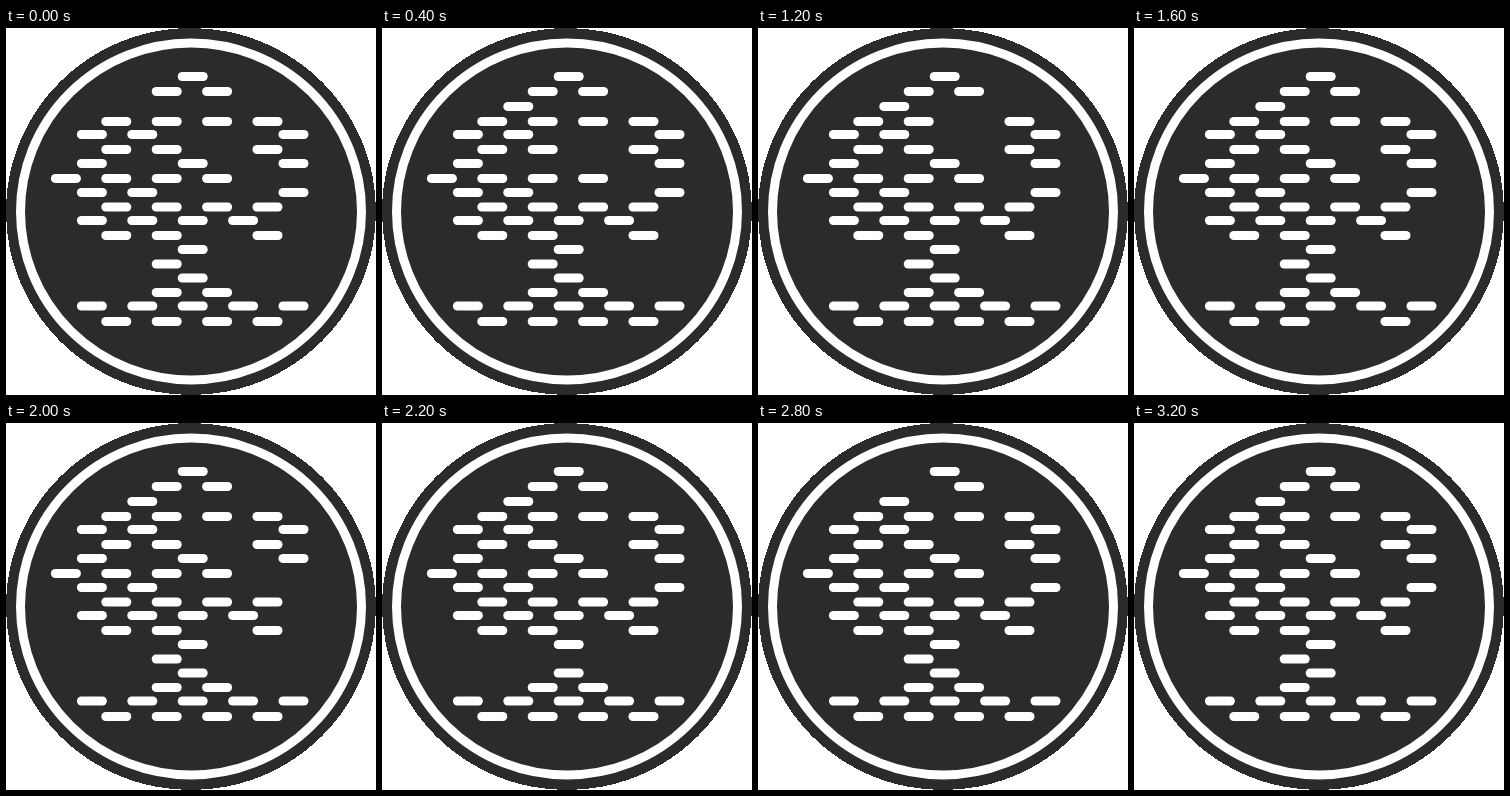
Animation, 370 px wide and 367 px high, one loop 3.4 s. Source, as an HTML page:

```html
<!DOCTYPE html>
<html lang="en">
<head>
<meta charset="utf-8">
<title>Dash tree</title>
<style>
  html, body { margin: 0; width: 100%; height: 100%; overflow: hidden; background: #fff; }
  svg { display: block; width: 370px; height: 367px; }
</style>
</head>
<body>
<svg viewBox="0 0 370 367" xmlns="http://www.w3.org/2000/svg">
  <ellipse cx="185" cy="183.5" rx="185" ry="183.5" fill="#2b2b2b" shape-rendering="crispEdges"/>
  <ellipse cx="185" cy="183.5" rx="170.5" ry="168.5" fill="none" stroke="#fff" stroke-width="9"/>
  <g id="dashes" fill="#fff"></g>
</svg>
<script>
  const STEP = 200;
  const WIDTH = 30, HEIGHT = 9;

  // Each row: centre height, then the columns that hold a dash.
  const rows = [
    [48.5, '5'], [63.5, '46'], [78.5, '3'], [93.5, '2468'], [106.5, '139'],
    [121.5, '248'], [135.5, '159'], [150.5, '0246'], [164.5, '139'],
    [179, '2468'], [192.5, '1357'], [207.5, '248'], [221.5, '5'], [236, '4'],
    [250, '5'], [264.5, '46'], [278, '13579'], [293.5, '2468']
  ];

  // The one dash missing in each step, as row:column.
  const blinks = ('2:3 11:2 6:5 5:2 1:6 3:4 3:6 0:5 17:6 ' +
    '3:2 8:9 13:4 17:2 16:3 1:4 9:4 15:6').split(' ');

  const columnX = c => 59.9 + 25.2 * c + (c % 2 ? 0.8 : 0);
  const group = document.getElementById('dashes');
  const dashes = {};

  function addDash(row, col, y) {
    const dash = document.createElementNS('http://www.w3.org/2000/svg', 'rect');
    const box = {
      x: columnX(col) - WIDTH / 2, y: y - HEIGHT / 2,
      width: WIDTH, height: HEIGHT, rx: HEIGHT / 2
    };
    for (const name in box) dash.setAttribute(name, box[name]);
    group.appendChild(dash);
    dashes[row + ':' + col] = dash;
  }

  rows.forEach(([y, cols], row) => {
    for (const col of cols) addDash(row, +col, y);
  });

  function draw(time) {
    const missing = blinks[Math.floor(time / STEP) % blinks.length];
    for (const key in dashes) {
      dashes[key].setAttribute('visibility', key === missing ? 'hidden' : 'visible');
    }
  }

  const start = performance.now();
  function tick() {
    draw(performance.now() - start);
    requestAnimationFrame(tick);
  }
  tick();
</script>
</body>
</html>
```
